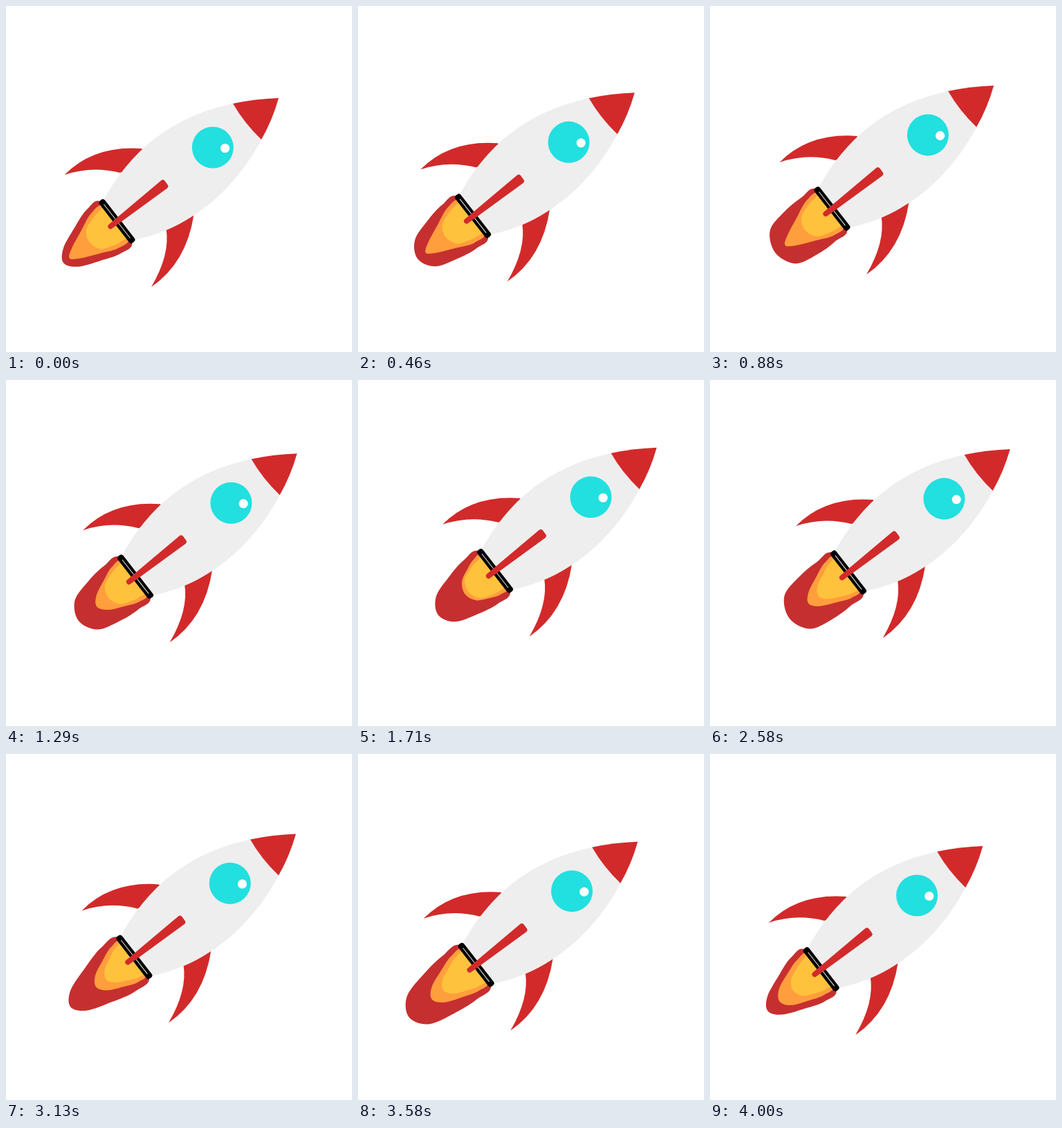
An HTML page with a canvas that plays this animation: 500x500 px, repeating every 4.04 s.

```html
<!DOCTYPE html>
<html lang="en">
<head>
<meta charset="utf-8">
<title>Rocket</title>
<style>
  html, body { margin: 0; width: 100%; height: 100%; overflow: hidden; background: #fff; }
  canvas { display: block; width: 500px; height: 500px; }
</style>
</head>
<body>
<canvas id="stage" width="500" height="500"></canvas>
<script>
const ctx = document.getElementById('stage').getContext('2d');
const LOOP = 4040, STEP = 1000 / 24;
const RED = '#d22a2a', GREY = '#eeeeee';

// Turning points of the hovering path
const path = [
  { t: 0, x: 0, y: 0 },
  { t: 880, x: 16.2, y: -18.2 },
  { t: 2170, x: 44.5, y: -39.5 },
  { t: 3130, x: 24.8, y: -17.5 }
];

// Every layer is the same teardrop; only its length and fullness flicker
const beats = [0, 880, 1710, 2580, 3130, 3580, 4000];
const flames = [
  { color: '#c62f2f', width: 40,
    length: [98, 104, 104, 108, 117, 123, 98], full: [0, 1, 0.45, 1, 0.15, 0.65, 0] },
  { color: '#ff9e3d', width: 32,
    length: [87, 86, 55, 73, 70, 81, 76], full: [-0.4, -0.4, 0.3, -0.1, 0, 0.05, 0.1] },
  { color: '#ffc23c', width: 27,
    length: [50, 50, 49, 55, 52, 60, 51], full: [0.6, 0.6, 0.6, 0, 0, 0.1, 0.3] }
];

const lerp = (a, b, u) => a + (b - a) * u;

// Cyclic cubic through the turning points
function hover(t) {
  const n = path.length;
  const key = i => {
    const k = path[(i + n) % n];
    return { ...k, t: k.t + Math.floor(i / n) * LOOP };
  };
  let i = 0;
  while (key(i + 1).t <= t) i++;
  const [a, b, c, d] = [key(i - 1), key(i), key(i + 1), key(i + 2)];
  const span = c.t - b.t, u = (t - b.t) / span, v = 1 - u;
  const along = axis => {
    const m1 = (c[axis] - a[axis]) / (c.t - a.t) * span;
    const m2 = (d[axis] - b[axis]) / (d.t - b.t) * span;
    return v * v * (1 + 2 * u) * b[axis] + u * v * v * m1 +
           u * u * (3 - 2 * u) * c[axis] - u * u * v * m2;
  };
  return [along('x'), along('y')];
}

function flicker(values, t) {
  let i = 0;
  while (i < beats.length - 2 && beats[i + 1] <= t) i++;
  const u = Math.min(1, (t - beats[i]) / (beats[i + 1] - beats[i]));
  return lerp(values[i], values[i + 1], u * u * (3 - 2 * u));
}

function fillCurve(pts, color) {
  const n = pts.length, at = i => pts[(i + n) % n];
  ctx.beginPath();
  ctx.moveTo(...pts[0]);
  for (let i = 0; i < n; i++) {
    const [p, q, r, s] = [at(i - 1), at(i), at(i + 1), at(i + 2)];
    ctx.bezierCurveTo(
      q[0] + (r[0] - p[0]) / 6, q[1] + (r[1] - p[1]) / 6,
      r[0] - (s[0] - q[0]) / 6, r[1] - (s[1] - q[1]) / 6, r[0], r[1]);
  }
  ctx.fillStyle = color;
  ctx.fill();
}

function drawFlame({ color, width, length, full }, t) {
  const len = flicker(length, t), f = flicker(full, t);
  const side = [
    [0, 0.86], [0.25, 1], [0.56, lerp(0.75, 0.97, f)], [0.87, lerp(0.42, 0.75, f)]
  ].map(([s, w]) => [s * len, w * width]);
  const mirror = side.map(([x, y]) => [x, -y]).reverse();
  fillCurve([...side, [len, 0], ...mirror], color);
}

const fins = new Path2D(
  'M84.5 244Q127 201 196 206L212 222L165 241Q124 230.5 84.5 244Z' +
  'M210 406Q261 371 271.5 301L250 290L231.5 322Q237.5 359 210 406Z');
const body = new Path2D(
  'M328 141C239 160 179 209 139 284L186 338C280.5 319 341 247 369 193L385 150Z');
const nose = new Path2D('M394 133Q361 134 328 141Q344 169 369 193Q385 165 394 133Z');
const stripe = new Path2D('M151 318.5L226.5 255L230.5 260.5Z');

function fill(shape, color) {
  ctx.fillStyle = color;
  ctx.fill(shape);
}

function disc(x, y, r, color) {
  ctx.beginPath();
  ctx.arc(x, y, r, 0, Math.PI * 2);
  ctx.fillStyle = color;
  ctx.fill();
}

function drawBand() {
  ctx.beginPath();
  ctx.roundRect(-4.9, -38.5, 9.8, 77, 4);
  ctx.fillStyle = '#000';
  ctx.fill();
  ctx.fillStyle = GREY;
  ctx.fillRect(-0.5, -31, 1, 62);
}

// Runs a drawing with its x axis pointing out of the engine
function atEngine(paint) {
  ctx.save();
  ctx.translate(160.4, 311);
  ctx.rotate(2.48);
  paint();
  ctx.restore();
}

function draw(t) {
  ctx.setTransform(1, 0, 0, 1, 0, 0);
  ctx.fillStyle = '#fff';
  ctx.fillRect(0, 0, 500, 500);
  ctx.translate(...hover(t));

  atEngine(() => flames.forEach(layer => drawFlame(layer, t)));
  fill(fins, RED);
  fill(body, GREY);
  fill(nose, RED);
  disc(298.8, 204.5, 30, '#22dfe0');
  disc(316.5, 205.5, 6.6, '#fff');
  atEngine(drawBand);

  fill(stripe, RED);
  ctx.strokeStyle = RED;
  ctx.lineWidth = 7.5;
  ctx.lineJoin = 'round';
  ctx.stroke(stripe);
}

// The picture advances 24 times a second
function tick() {
  const t = performance.now() % LOOP;
  draw(Math.floor((t + 4.99) / STEP) % 97 * STEP);
  requestAnimationFrame(tick);
}
tick();
</script>
</body>
</html>
```
